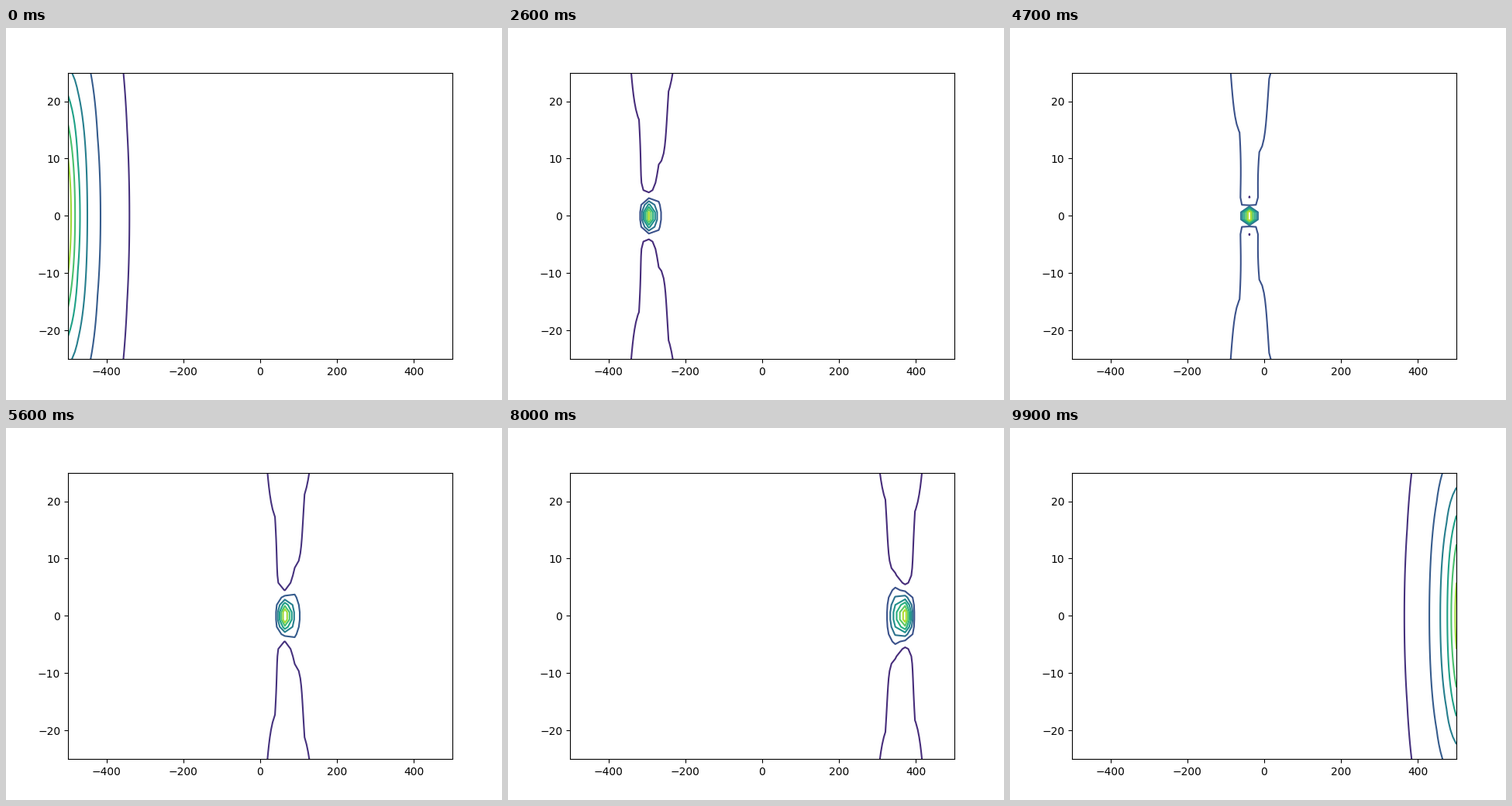
These frames come from a looping animation (640x480 px, 10 s). A matplotlib script:

```python
import numpy as np
import matplotlib.pyplot as plt
from matplotlib.animation import FuncAnimation

FRAMES = 100
B = 2.0               # lump parameter, sets the width and the speed
SPEED = 3 * B**2
X0 = 1.0

x, y = np.meshgrid(np.linspace(-500, 500, 40), np.linspace(-25, 25, 40))


def lump(t):
    """Rational travelling wave on the grid at time t."""
    xx = (x - X0 - SPEED * t)**2
    yy = (B * y)**2
    return 4 * (xx - yy + 1 / B**2) / (xx + yy - 1 / B**2)**2


fig, ax = plt.subplots(figsize=(6.4, 4.8), dpi=100)


def draw(i):
    ax.clear()
    ax.contour(x, y, lump(i - FRAMES // 2))
    return []


anim = FuncAnimation(fig, draw, frames=FRAMES, interval=100,
                     init_func=lambda: [], repeat=True, repeat_delay=0)
plt.show()
```
